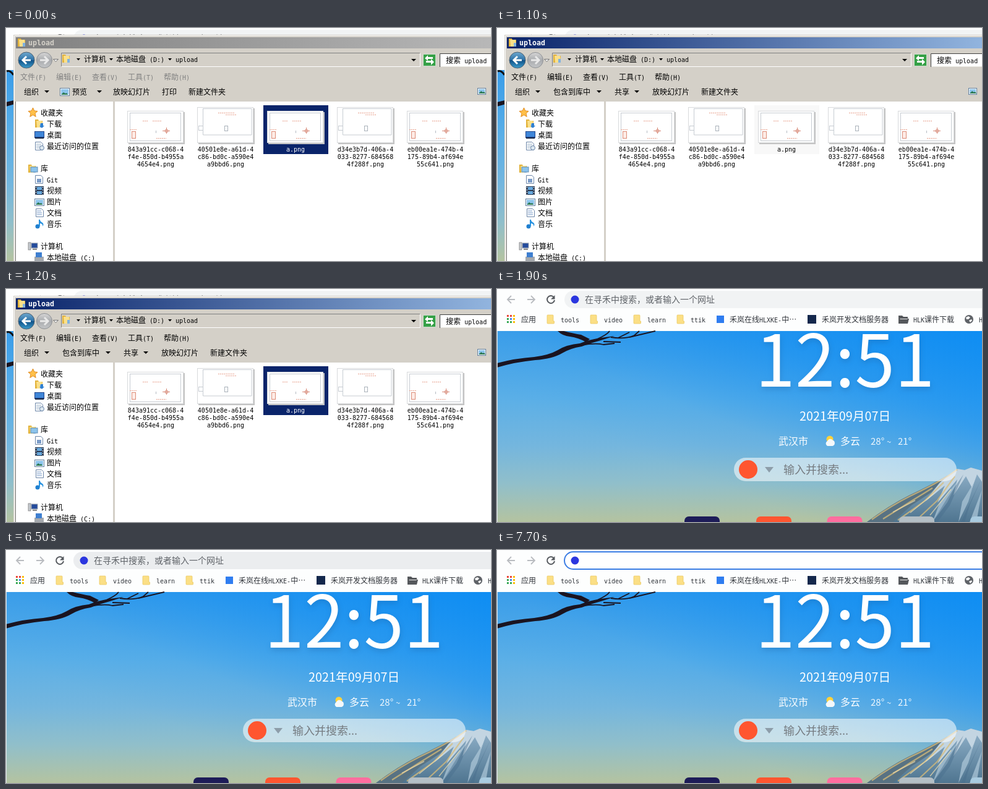
These frames come from a looping animation (784x377 px, 8000 ms). An HTML page:

```html
<!DOCTYPE html>
<html lang="zh-CN">
<head>
<meta charset="utf-8">
<title>Upload folder and new tab</title>
<style>
html, body { margin: 0; width: 100%; height: 100%; overflow: hidden; background: #fff; }
svg { display: block; width: 784px; height: 377px; }
text { font: 12px "Noto Sans CJK SC", "Noto Sans CJK", sans-serif; white-space: pre; }
.mono { font: 10px "DejaVu Sans Mono", "Noto Sans Mono", monospace; }
.bold { font: bold 11.6px "DejaVu Sans Mono", monospace; }
.clock { filter: drop-shadow(1px 4px 4px rgba(20, 60, 110, .2)); }
</style>
</head>
<body>
<svg id="stage" viewBox="0 0 784 377" xmlns="http://www.w3.org/2000/svg"></svg>
<script>
const LOOP = 8000;
const FACE = '#d4d0c8', NAVY = '#0a246a';

const rect = (x, y, w, h, fill, more = '') =>
  `<rect x="${x}" y="${y}" width="${w}" height="${h}" fill="${fill}" ${more}/>`;
const circle = (x, y, r, fill, more = '') =>
  `<circle cx="${x}" cy="${y}" r="${r}" fill="${fill}" ${more}/>`;
const path = (d, fill, more = '') => `<path d="${d}" fill="${fill}" ${more}/>`;
const line = (d, color, width = 1, more = '') =>
  path(d, 'none', `stroke="${color}" stroke-width="${width}" ${more}`);
const group = (id, body, more = '') => `<g id="${id}" ${more}>${body}</g>`;
const down = (x, y, w, h, fill = '#000') =>
  path(`M${x} ${y}h${w}l${-w / 2} ${h}z`, fill);
const gradient = (id, stops, dir = 'x1="0" y1="0" x2="0" y2="1"') =>
  `<linearGradient id="${id}" ${dir}>` + stops.map(([at, color, alpha = 1]) =>
    `<stop offset="${at}" stop-color="${color}" stop-opacity="${alpha}"/>`).join('') +
  '</linearGradient>';

// Small interface text: Latin runs are monospaced, half as wide as the Chinese ones.
function label(x, cy, str, fill = '#000', more = '') {
  const runs = str.match(/[\x00-\x7f]+|[^\x00-\x7f]+/g).map(run =>
    run.charCodeAt(0) < 128 ? `<tspan class="mono">${run}</tspan>` : run);
  return `<text x="${x}" y="${cy + 4.5}" fill="${fill}" ${more}>${runs.join('')}</text>`;
}
const big = (x, y, size, str, fill = '#fff', more = '') =>
  `<text x="${x}" y="${y}" fill="${fill}" style="font-size:${size}px" ${more}>${str}</text>`;

const folder = (x, y) =>
  path(`M${x} ${y + 1}h5l1 2h6v11h-12z`, '#e2b33c') +
  path(`M${x + 2} ${y + 3}h9l1 11h-9z`, '#fbe08a') +
  rect(x + 8, y + 8, 4, 6, '#7fb2e0');

function defs() {
  const across = 'x1="0" y1="0" x2="1" y2="0"';
  return '<defs>' +
    gradient('sky', [[0, '#3f9fe8'], [.35, '#5bafe7'], [.6, '#74b6de'], [.8, '#91bfca'], [1, '#b4c3a0']]) +
    gradient('deep', [[.25, '#0c8cf4', 0], [.44, '#0c8cf4', .1], [.72, '#0c8cf4', .6], [1, '#0a8cf4', .92]],
      'x1=".1" y1=".9" x2="1" y2="0"') +
    gradient('rock', [[0, '#93b3cb'], [.5, '#6f93ad'], [1, '#4f7590']]) +
    gradient('active', [[0, NAVY], [1, '#a6caf0']], across) +
    gradient('idle', [[0, '#808080'], [1, '#c0c0c0']], across) +
    gradient('orb', [[0, '#6fa9cf'], [.48, '#2f73a8'], [.5, '#0f4f86'], [1, '#3c9ccb']]) +
    gradient('dim', [[0, '#d6d6d6'], [.5, '#a9abae'], [1, '#c4c6c8']]) +
    '</defs>';
}

function branch() {
  const dark = '#1a1420';
  return path('M0 120Q30 112 60 110Q84 107 98 99Q112 90 134 88Q148 82 168 79L190 76L168 83Q150 88 137 93Q118 96 105 104Q90 113 62 115Q30 118 0 127z', dark) +
    path('M98 68H108Q124 72 136 74L150 81L144 86Q132 79 118 77Q106 76 98 68z', dark) +
    line('M136 91Q160 87 172 90L190 88M160 82Q178 74 182 68M184 78Q206 82 222 75L230 68M196 79L214 70M214 78L256 68M172 85L200 86', dark, 1.8);
}

function mountain() {
  return path('M598 377Q634 350 666 334Q702 317 729 301L744 291L756 293L766 289L784 294V377z', 'url(#rock)') +
    path('M598 377Q634 350 666 334Q702 317 729 301L702 329L670 350L640 377z', '#587283') +
    path('M744 291L756 293L766 289L784 294V312L776 300L768 322L758 303L738 334L744 308L712 346L724 318L692 344L716 313z', '#c3d5e2') +
    path('M744 312L728 345L704 377L716 345zM771 313L762 344L746 377L752 344zM784 325L775 377H764z', '#b0c9da', 'opacity=".7"') +
    path('M754 300L732 350L712 377H704L728 338zM784 305L764 350L756 377H750z', '#476e8c', 'opacity=".45"') +
    line('M606 373Q638 350 668 335Q702 319 730 302L744 292M624 372L670 343L704 322M648 374L690 344L722 313M680 372L712 342L740 303', '#d9bd78', 2.2, 'opacity=".75"') +
    line('M640 361L676 342M668 362L706 331M700 366L734 324', '#f1dfae', 1.5, 'opacity=".7"');
}

function weather() {
  return circle(538, 243, 5.5, '#ffd23c') +
    path('M534 254a4.5 4.5 0 0 1 0-8a5 5 0 0 1 8.500-1.500a5 5 0 0 1 0 9.500z', '#f4f8fb');
}

function page() {
  const tiles = [[303, '#1d1c58'], [419, '#ff5630'], [533.5, '#ff6d9f'], [650, '#b4bfc6'], [765, '#a9cbe0']];
  const thin = 'font-weight="300" opacity=".9"';
  return rect(0, 68, 784, 309, 'url(#sky)') + rect(0, 68, 784, 309, 'url(#deep)') +
    branch() + mountain() + rect(0, 68, 1, 309, '#e4ebf0') +
    big(417.5, 158, 116, '12:51', '#fff', 'class="clock"') +
    big(489, 213, 19.8, '2021年09月07日') +
    big(455, 251.5, 16, '武汉市') + weather() + big(555, 251.5, 16, '多云') +
    big(604, 251.5, 15, '28°', '#fff', thin) +
    big(630, 251.5, 13, '~', '#fff', thin) +
    big(648, 251.5, 15, '21°', '#fff', thin) +
    rect(383, 273, 360, 38, '#fff', 'rx="19" opacity=".55"') +
    circle(406, 292, 15, '#ff5630') + down(433, 288, 14, 9, '#8d9da9') +
    big(463, 298.5, 18, '输入并搜索...', '#757b80') +
    tiles.map(([x, fill]) => rect(x, 368, 57, 40, fill, 'rx="7"')).join('');
}

function bookmarks() {
  const dots = ['#ea4335', '#ea4335', '#fbbc05', '#34a853', '#4285f4', '#fbbc05', '#34a853', '#34a853', '#fbbc05'];
  const folders = [[81, 'tools'], [151, 'video'], [221, 'learn'], [291, 'ttik']];
  const ink = '#30343a';
  return dots.map((c, i) => rect(16 + i % 3 * 5, 42 + Math.floor(i / 3) * 5, 3, 3, c)).join('') +
    label(39, 49, '应用', ink) +
    folders.map(([x, name]) =>
      path(`M${x} 43q0-1 1-1h8q1 0 1 1v9h1.500v3q0 1-1 1h-9.500q-1 0-1-1z`, '#fbdf85', 'stroke="#e8c65c" stroke-width=".7"') +
      label(x + 22, 49, name, ink)).join('') +
    rect(355, 43, 12, 12, '#2f7df0') + label(376, 49, '禾岚在线HLXKE-中…', ink) +
    rect(502, 42, 14, 14, '#14284c') + label(525, 49, '禾岚开发文档服务器', ink) +
    path('M649 43h6l2 2h7v3h2l-2 8h-15z', '#55585c') + line('M651.5 48.500h12', '#eee') +
    label(673, 49, 'HLK课件下载', ink) +
    circle(763, 49, 7, '#5f6368') +
    path('M758 46l4-2 3 2-3 3h-3zM763 51l4-2 1 2-3 3z', '#fff') + label(779, 49, 'H', ink);
}

function browser() {
  const arrow = (x, way) => line(`M${x - 6 * way} 17h${12 * way}m${-6 * way} -6l${6 * way} 6l${-6 * way} 6`, '#b9bcc0', 1.8);
  return rect(0, 0, 784, 68, '#fdfefe') + arrow(23, -1) + arrow(55, 1) +
    line('M92 13.500A6 6 0 1 0 93 18', '#55595e', 2) + path('M93.500 10v6.500h-6.500z', '#55595e') +
    `<rect id="omnibox" x="109" y="3" width="720" height="28" rx="14"/>` +
    circle(126, 17, 6.5, '#2b36df') +
    group('hint', big(142, 22, 14, '在寻禾中搜索，或者输入一个网址', '#5f6368')) +
    group('caret', rect(143, 10, 1, 14, '#000')) +
    bookmarks() + page();
}

const picture = (x, y, w = 15, h = 12) =>
  rect(x + .5, y + .5, w - 1, h - 1, '#fff', 'stroke="#5f7f9f"') + rect(x + 2, y + 2, w - 4, h - 4, '#8cc4ec') +
  path(`M${x + 2} ${y + h - 2}l4-4 3 2 2-1 2 3z`, '#2d7a55');

const sheet = (x, y) =>
  path(`M${x + .5} ${y + .5}h9l3 3v10h-12z`, '#fff', 'stroke="#6c86a8"');

function navigation() {
  const rows = [
    [56, 137, '收藏夹'], [66, 155, '下载'], [66, 173, '桌面'], [66, 191, '最近访问的位置'],
    [56, 227, '库'], [66, 245, 'Git'], [66, 263, '视频'], [66, 281, '图片'],
    [66, 299, '文档'], [66, 317, '音乐'], [56, 353, '计算机'], [66, 371, '本地磁盘 (C:)']
  ];
  return rows.map(row => label(...row)).join('') +
    path('M43.500 129l2.300 5 5.200.6-4 3.600 1.200 5.300-4.700-2.800-4.700 2.800 1.200-5.300-4-3.600 5.200-.6z', '#ffc04a', 'stroke="#e08a1e"') +
    folder(47, 147) + path('M56 154h4v4h2l-4 4-4-4h2z', '#2f7fd0') +
    rect(46, 167, 16, 11, '#22468c') + rect(47, 168, 14, 8, '#3f86d8') + rect(47, 177, 14, 2, '#1d2d4c') +
    sheet(47, 184) + line('M49 188h8M49 191h8M49 194h5', '#8fa8c0') + circle(58, 194, 3.5, '#dce8f0', 'stroke="#6c86a8"') +
    folder(36, 220) + rect(40, 225, 11, 8, '#8cc4ec', 'stroke="#5f8db5"') +
    sheet(47, 238) + rect(50, 244, 7, 6, '#7c9cc8') +
    rect(47, 256, 14, 14, '#2c3a52') + rect(50, 257, 8, 5, '#67a8dc') + rect(50, 264, 8, 5, '#67a8dc') +
    line('M48.500 257v13M59.500 257v13', '#dde5ee', 1, 'stroke-dasharray="2 2"') +
    picture(46, 276, 16) +
    sheet(48, 292) + line('M50 296h7M50 299h8M50 302h8', '#6f94c4') +
    circle(51, 321, 3.5, '#1f7fd0') + path('M53 310h2q0 3 4 5 3 3 0 6 1-4-4-5v5h-2z', '#2a93e0') +
    rect(36, 347, 4, 12, '#c5c9ce', 'stroke="#777" stroke-width=".7"') +
    rect(41, 348, 10, 8, '#244b9c', 'stroke="#9fa6b0"') + rect(43, 357, 7, 2, '#888') +
    rect(46, 370, 15, 7, '#a5a9ae') + rect(48, 363, 10, 8, '#3f7fd0');
}

const GREY = '#c7ccd2', RED = '#e8a08c';

function thumbnail(cx, tall) {
  const x = cx - 46, y = tall ? 128 : 134, h = tall ? 58 : 52;
  const frame = rect(x + 2, y + 2, 91, h, '#c4c4c4') + rect(x + .5, y + .5, 90, h - 1, '#fff', 'stroke="#d8dadc"');
  if (tall) {
    return frame + line(`M${x + 9.5} ${y + 2}V${y + 45}H${x + 88}V${y + 2.5}H${x + 9}`, GREY) +
      line(`M${x + 34} ${y + 9.5}h27M${x + 46} ${y + 12.5}h18`, RED, 1.2, 'stroke-dasharray="2 1"') +
      rect(x + 2.5, y + 30.5, 7, 7, 'none', `stroke="${GREY}"`) +
      rect(x + 44.5, y + 30.5, 5, 8, 'none', 'stroke="#aab2ba"');
  }
  return frame + rect(x + 4.5, y + 3.5, 82, h - 7, 'none', `stroke="${GREY}"`) +
    line(`M${x + 25} ${y + 16.5}h9M${x + 41} ${y + 16.5}h14M${x + 4} ${y + 30.5}h12M${x + 47} ${y + 44.5}h16`, RED, 1, 'stroke-dasharray="2 1"') +
    rect(x + 7.5, y + 33.5, 6, 11, '#fdece6', 'stroke="#dc8c78"') +
    line(`M${x + 57} ${y + 32.5}h12M${x + 63.5} ${y + 27}v10`, '#d88a78') +
    circle(x + 63.5, y + 32.5, 2.5, 'none', 'stroke="#d88a78"') +
    line(`M${x + 46.5} ${y + 32}v4`, '#b4bac2');
}

function files() {
  const names = [
    ['843a91cc-c068-4', 'f4e-850d-b4955a', '4654e4.png'],
    ['40501e8e-a61d-4', 'c86-bd0c-a590e4', 'a9bbd6.png'],
    ['a.png'],
    ['d34e3b7d-406a-4', '033-8277-684568', '4f288f.png'],
    ['eb00ea1e-474b-4', '175-89b4-af694e', '55c641.png']
  ];
  return `<rect id="mark" x="416" y="125" width="105" height="79"/>` +
    names.map((lines, i) => {
      const cx = 242 + i * 113;
      const text = lines.map((s, k) => label(cx, 195 + k * 12, s, 'currentColor', 'text-anchor="middle"')).join('');
      return thumbnail(cx, i % 2 === 1 && i < 4) + group('name' + i, text, 'color="#000"');
    }).join('');
}

function toolbars() {
  const viewing = picture(87, 97, 16, 13) + label(107, 103, '预览') + down(147, 101, 8, 4) +
    label(173, 103, '放映幻灯片') + label(252, 103, '打印') + label(295, 103, '新建文件夹');
  const general = label(91, 103, '包含到库中') + down(161, 101, 8, 4) + label(190, 103, '共享') +
    down(222, 101, 8, 4) + label(251, 103, '放映幻灯片') + label(330, 103, '新建文件夹');
  return label(29, 103, '组织') + down(62, 101, 8, 4) +
    group('viewing', viewing) + group('general', general) + picture(762, 97, 14, 11);
}

function addressRow() {
  return circle(33, 52, 13, 'url(#orb)', 'stroke="#4d6172"') +
    line('M40 52H27m6-6l-6 6l6 6', '#fff', 3) +
    circle(62, 52, 12.5, 'url(#dim)', 'stroke="#8d9094"') +
    line('M55 52h13m-6-6l6 6l-6 6', '#e9e9e9', 3) +
    path('M76.500 50.500h8l-4 4z', '#eee', 'stroke="#777"') +
    line('M89.500 62V40.500H669', '#808080') + line('M90 62.500H669.500V41', '#fff') +
    folder(91, 42) + [114, 167, 262].map(x => down(x, 49, 6, 3.5)).join('') +
    label(126, 50.5, '计算机') + label(178, 50.5, '本地磁盘 (D:)') + label(274, 50.5, 'upload') +
    down(655, 50, 8, 4) +
    rect(674.5, 42.5, 20, 19, '#35a046', 'stroke="#c9ddc9"') +
    path('M677 49l5-5v3h8v3h-8v3zM692 55l-5-5v3h-8v3h8v4z', '#fff') +
    rect(701, 41, 90, 22, '#fff') + line('M701.500 63V41.500H784', '#404040') + line('M702 62.500h82', '#e8e6e0') +
    label(711, 52, '搜索 upload');
}

function explorer() {
  const menu = ['文件(F)', '编辑(E)', '查看(V)', '工具(T)', '帮助(H)'];
  return rect(12, 11, 772, 366, FACE) + line('M13.500 377V12.500H784', '#fff') +
    `<rect id="title" x="16" y="15" width="884" height="18"/>` + folder(19, 16) +
    `<text id="caption" class="bold" x="36" y="28">upload</text>` +
    addressRow() +
    group('menu', menu.map((s, i) => label(23 + i * 58, 79, s, 'currentColor')).join('')) +
    toolbars() +
    rect(16, 119, 768, 258, '#fff') + line('M15.500 119V377', '#808080') +
    rect(173, 119, 3, 258, FACE) + navigation() + files();
}

document.getElementById('stage').innerHTML = defs() + browser() +
  group('window', line('M1 70Q7 68 12 76', '#111', 3) + explorer());

const el = id => document.getElementById(id);
const show = (id, on) => el(id).style.display = on ? '' : 'none';
const set = (id, name, value) => el(id).setAttribute(name, value);

function update(t) {
  const idle = t < 100;
  const selected = idle || t >= 1200;
  const hover = t >= 1100 && t < 1200;
  const general = t >= 1100 && t < 1700;
  const focused = t >= 7400;

  show('window', t < 1900);
  set('title', 'fill', `url(#${idle ? 'idle' : 'active'})`);
  set('caption', 'fill', idle ? FACE : '#fff');
  set('menu', 'color', idle ? '#808080' : '#000');
  show('general', general);
  show('viewing', !general);
  set('mark', 'fill', selected ? NAVY : hover ? '#f8f8f8' : '#fff');
  set('name2', 'color', selected ? '#fff' : '#000');

  set('omnibox', 'fill', focused ? '#fff' : t >= 6500 ? '#ebedef' : '#f1f3f4');
  set('omnibox', 'stroke', focused ? '#3b7de4' : 'none');
  set('omnibox', 'stroke-width', 2);
  show('hint', !focused);
  show('caret', focused && t < 7700);
}

const start = performance.now();
function tick() {
  update((performance.now() - start) % LOOP);
  requestAnimationFrame(tick);
}
tick();
</script>
</body>
</html>
```
